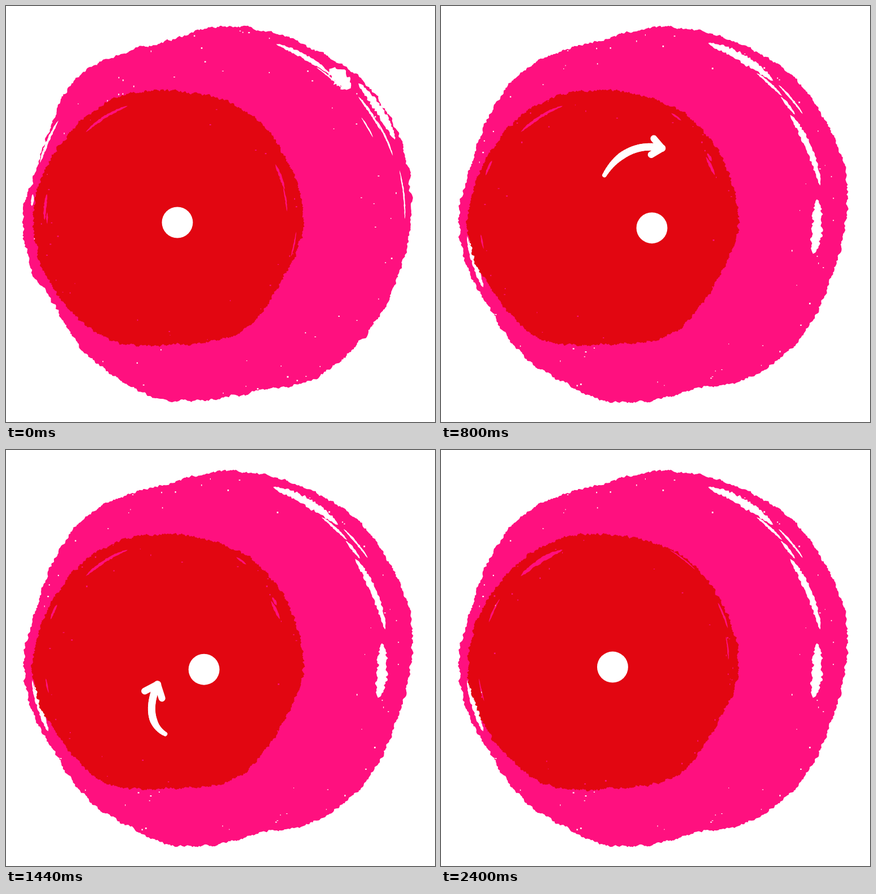
Write an HTML page with a canvas that moves like this. It is 761x736 px and loops after 2.48 s.

```html
<!DOCTYPE html>
<html lang="en">
<head>
<meta charset="utf-8">
<title>Painted circles</title>
<style>
  html, body { margin: 0; width: 100%; height: 100%; overflow: hidden; background: #fff; }
  canvas { display: block; }
</style>
</head>
<body>
<canvas id="stage" width="761" height="736"></canvas>
<script>
const W = 761, H = 736, LOOP = 2480, STEP = 80, TAU = 2 * Math.PI;
const ctx = document.getElementById('stage').getContext('2d');

let seed = 7;
const random = () => (seed = (seed * 16807) % 2147483647) / 2147483647;
const between = (a, b) => a + (b - a) * random();

// Closed Catmull-Rom interpolation through evenly spaced radii.
function radiusAt(radii, turn) {
  const n = radii.length, i = Math.floor(turn * n), u = turn * n - i;
  const [a, b, c, d] = [-1, 0, 1, 2].map(k => radii[(i + k + n) % n]);
  return b + u / 2 * (c - a + u * (2 * a - 5 * b + 4 * c - d + u * (3 * (b - c) + d - a)));
}

// Dry-brush gap: a ragged, tapered arc. Angles are in degrees.
function scratch(g, [angle, span, radius, width]) {
  const steps = Math.max(4, Math.round(span * radius / 170));
  const outer = [], inner = [];
  for (let i = 0; i <= steps; i++) {
    const u = i / steps, a = (angle + span * (u - 0.5)) * TAU / 360;
    const half = width / 2 * Math.sqrt(Math.sin(Math.PI * u));
    const point = r => [r * Math.cos(a), r * Math.sin(a)];
    outer.push(point(radius + half * between(0.65, 1.35)));
    inner.unshift(point(radius - half * between(0.65, 1.35)));
  }
  g.beginPath();
  for (const p of outer.concat(inner)) g.lineTo(...p);
  g.fill();
}

// One painted disc; every call gives a new ragged edge and new brush marks.
function paint({ color, x, y, radii, specks, streaks }, gaps) {
  const layer = document.createElement('canvas');
  layer.width = W;
  layer.height = H;
  const g = layer.getContext('2d'), phase = random() * TAU;
  g.translate(x, y);
  g.fillStyle = color;
  g.beginPath();
  let rough = 0;
  for (let i = 0; i < 900; i++) {
    const a = i / 900 * TAU;
    rough = 0.7 * rough + between(-1.8, 1.8);
    const r = radiusAt(radii, i / 900) + 1.5 * Math.sin(7 * a + phase) + rough;
    g.lineTo(r * Math.cos(a), r * Math.sin(a));
  }
  g.fill();
  g.globalCompositeOperation = 'destination-out';
  for (const gap of gaps) scratch(g, gap);
  for (let i = 0; i < streaks; i++) {
    // Thin marks gather on the right and left sides.
    const angle = i % 3 ? between(-65, 15) : between(165, 215);
    scratch(g, [angle, between(3, 15), radii[0] * between(0.88, 0.97), between(2, 5)]);
  }
  for (let i = 0; i < specks; i++) {
    const a = random() * TAU, r = radii[0] * (1 - 0.04 - 0.22 * random() ** 2);
    g.fillRect(r * Math.cos(a), r * Math.sin(a), between(1, 3), between(1, 3));
  }
  return layer;
}

const pink = {
  color: '#ff107f', x: 375, y: 370, specks: 75, streaks: 8,
  radii: [343, 337, 339, 339, 334, 319, 327, 338, 337, 339, 330, 343,
    344, 332, 337, 346, 333, 321, 332, 338, 340, 350, 351, 351]
};
const red = {
  color: '#e20611', x: 288, y: 375, specks: 30, streaks: 5,
  radii: [239, 231, 237, 225, 240, 237, 241, 231, 233, 225, 232, 235]
};

// Large gaps: angle, span, radius, width.
const pinks = {
  A: paint(pink, [[-48, 9, 326, 27], [-33, 20, 342, 13], [-61, 20, 320, 8]]),
  B: paint(pink, [[-45, 25, 325, 10], [-37, 32, 346, 9], [-68, 11, 300, 10]]),
  C: paint(pink, [[-37, 23, 343, 10], [3, 25, 297, 17], [160, 11, 336, 6]]),
  D: paint(pink, [[-60, 24, 320, 14], [-23, 26, 302, 11], [4, 19, 293, 18], [165, 16, 326, 10]])
};
const reds = {};
for (const name of 'abcde') reds[name] = paint(red, [[238, 24, 211, between(2, 8)]]);

// Repeating order of the paintings, one letter per step.
const pinkCycle = 'AADDBCDA', redCycle = 'aaeecdbb';

const dotKeys = [[0, 304, 383], [560, 308, 276], [960, 410, 456], [1280, 334, 353],
  [1680, 383, 453], [2080, 308, 393], [LOOP, 304, 383]];

// Path: cubic Bezier. Keys: time, tail, head, size of the arrowhead.
const arrows = [
  { path: [[281, 318], [318, 224], [422, 232], [460, 307]],
    keys: [[480, 0, 0, 0], [560, 0, 0.01, 0.5], [960, 0.12, 1, 1], [1280, 1, 1, 0.4], [1360, 1, 1, 0]] },
  { path: [[357, 508], [235, 530], [247, 438], [283, 391]],
    keys: [[960, 0, 0, 0], [1280, 0, 0.75, 1], [1680, 0.72, 1, 0.8], [1760, 1, 1, 0]] },
  { path: [[443, 334], [530, 390], [436, 528], [340, 433]],
    keys: [[1440, 0, 0, 0], [1680, 0, 0.41, 0.8], [2080, 0.42, 1, 1.1], [2400, 1, 1, 0]] }
];

const linear = u => u;
const smooth = u => u * u * (3 - 2 * u);

function sample(keys, t, ease) {
  const i = keys.findIndex(k => k[0] > t);
  if (i < 1) return null;
  const a = keys[i - 1], b = keys[i], u = ease((t - a[0]) / (b[0] - a[0]));
  return a.slice(1).map((v, k) => v + (b[k + 1] - v) * u);
}

function bezier(path, u) {
  const v = 1 - u, c = [v * v * v, 3 * v * v * u, 3 * v * u * u, u * u * u];
  return [0, 1].map(axis => path.reduce((sum, p, i) => sum + p[axis] * c[i], 0));
}

function line(from, to, width) {
  ctx.lineWidth = width;
  ctx.beginPath();
  ctx.moveTo(...from);
  ctx.lineTo(...to);
  ctx.stroke();
}

function drawArrow({ path, keys }, t) {
  const pose = sample(keys, t, linear);
  if (!pose || pose[2] === 0) return;
  const [tail, head, size] = pose, n = 24;
  const at = i => bezier(path, tail + (head - tail) * i / n);
  if (head - tail > 0.03) {
    for (let i = 0; i < n; i++) line(at(i), at(i + 1), 8 + 5 * Math.min(1, i / 8));
  }
  const tip = bezier(path, head), before = bezier(path, head - 0.06);
  const back = Math.atan2(before[1] - tip[1], before[0] - tip[0]);
  for (const turn of [-0.7, 0.7]) {
    const a = back + turn, r = 28 * size;
    line(tip, [tip[0] + r * Math.cos(a), tip[1] + r * Math.sin(a)], 12);
  }
}

function drawDot(t) {
  ctx.beginPath();
  ctx.arc(...sample(dotKeys, t, smooth), 27.5, 0, TAU);
  ctx.fill();
}

function draw(now) {
  const step = Math.floor(now % LOOP / STEP), t = step * STEP;
  ctx.fillStyle = ctx.strokeStyle = '#fff';
  ctx.lineCap = ctx.lineJoin = 'round';
  ctx.fillRect(0, 0, W, H);
  ctx.drawImage(pinks[pinkCycle[step % 8]], 0, 0);
  ctx.drawImage(reds[redCycle[step % 8]], 0, 0);
  for (const arrow of arrows) drawArrow(arrow, t);
  drawDot(t);
}

const start = performance.now();
function tick() {
  draw(performance.now() - start);
  requestAnimationFrame(tick);
}
tick();
</script>
</body>
</html>
```
